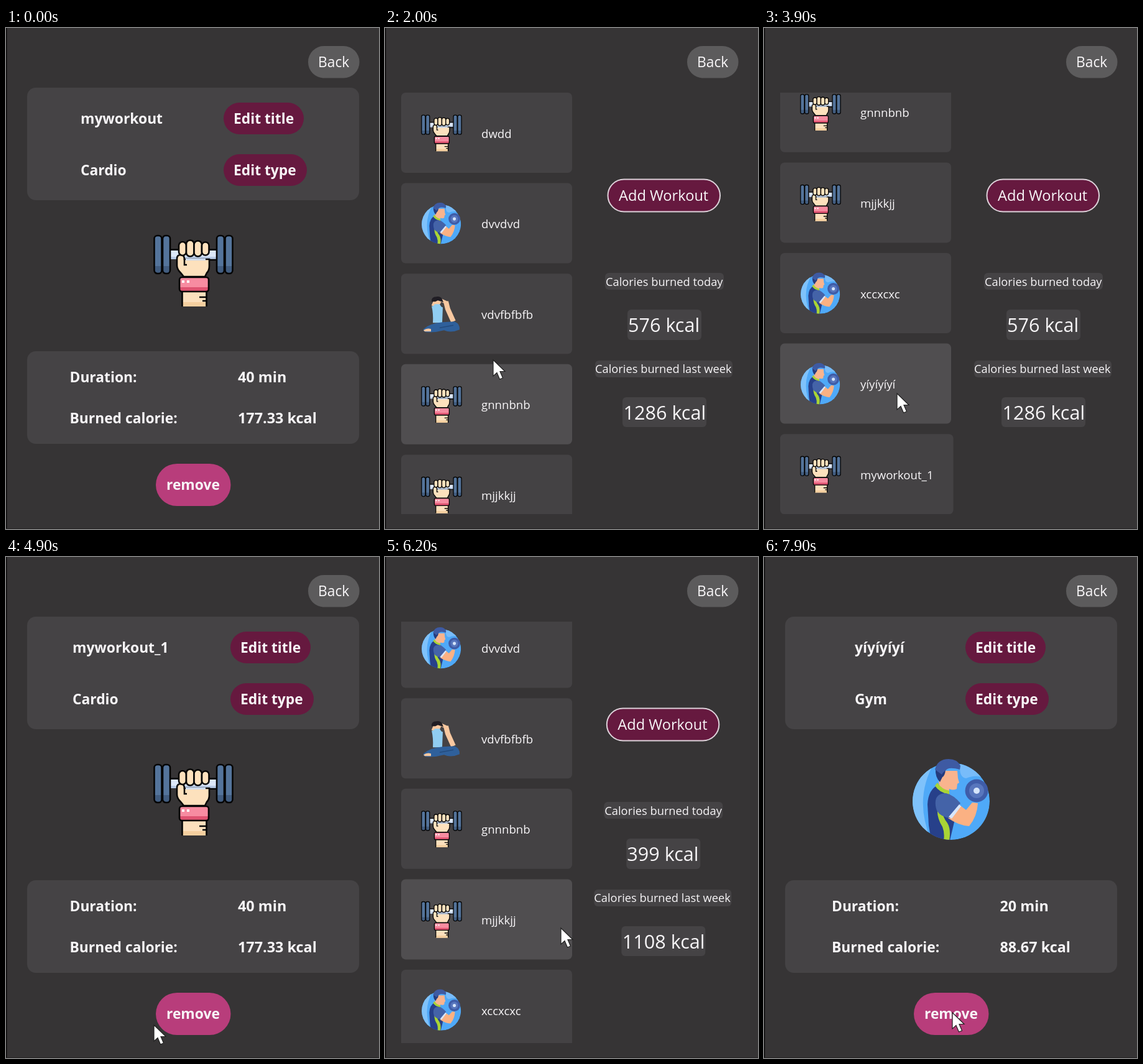
An HTML page for the animation above (8 s loop, 600 by 806 pixels).

```html
<!DOCTYPE html>
<html lang="en">
<head>
<meta charset="utf-8">
<title>Workout tracker</title>
<style>
  html, body { margin: 0; width: 100%; height: 100%; overflow: hidden; background: #363435; }
  svg { display: block; width: 100vw; height: 100vh; }
  text { font-family: "Open Sans", "Noto Sans", sans-serif; fill: #f8f6f8; white-space: pre; }
  .bold { font-weight: 700; font-size: 22.8px; }
  .value { font-size: 23.4px; }
  .mid { font-size: 22.8px; }
  .add { font-size: 23.6px; }
  .small { font-size: 18.3px; }
  .name { font-size: 18.6px; }
  .big { font-size: 30.6px; }
  .panel { fill: #454345; }
  .card { fill: #444244; }
  .card.hover { fill: #504e50; }
  .wine { fill: #66193f; }
</style>
</head>
<body>
<svg viewBox="0 0 600 806" xmlns="http://www.w3.org/2000/svg">
  <defs>
    <clipPath id="view"><rect x="20" y="104" width="300" height="678"/></clipPath>
    <clipPath id="disc"><circle cx="64" cy="67" r="62"/></clipPath>

    <g id="plate">
      <rect x="1.5" y="8" width="12" height="61" rx="5" fill="#54749b"/>
      <path d="M1.5 57h12v7q0 5-5 5h-2q-5 0-5-5z" fill="#425d80"/>
      <rect x="1.5" y="8" width="12" height="61" rx="5" fill="none" stroke="#050505" stroke-width="2.600"/>
    </g>

    <g id="cardio">
      <rect x="28" y="32" width="74" height="14" fill="#dce7f8"/>
      <path d="M28 42h74v4H28z" fill="#b9cbe6"/>
      <path d="M28 30.500h74M50 47h52" stroke="#050505" stroke-width="2.600"/>
      <use href="#plate"/><use href="#plate" x="13.500"/>
      <use href="#plate" x="100.500"/><use href="#plate" x="114"/>
      <path d="M38 45q0-6 6-6 6 0 6 7h40v11q0 7-4 11l-3 6H49l-5-6q-6-6-6-12z" fill="#fde1bd" stroke="#050505" stroke-width="2.600"/>
      <path d="M50 45v10h4" fill="none" stroke="#050505" stroke-width="2.500"/>
      <path d="M52 48h32v-3H52z" fill="#cfdcef"/>
      <g fill="#fde1bd" stroke="#050505" stroke-width="2.600">
        <rect x="41" y="18" width="12" height="22" rx="6"/>
        <rect x="53" y="15.500" width="12.500" height="26" rx="6"/>
        <rect x="65.500" y="16.500" width="12.500" height="25" rx="6"/>
        <rect x="78" y="18.500" width="11.500" height="21" rx="5.500"/>
      </g>
      <path d="M46.500 99h39v23h-39z" fill="#fce0bd"/>
      <path d="M46.500 115h39v7h-39z" fill="#f5cf9f"/>
      <path d="M46.500 99v23M85.500 99v23M74 107h11M79 113h6" stroke="#050505" stroke-width="2.600"/>
      <rect x="42" y="75" width="47" height="23" rx="4" fill="#f78ca1"/>
      <path d="M42 91h47v3q0 4-4 4H46q-4 0-4-4z" fill="#df5371"/>
      <rect x="42" y="75" width="47" height="23" rx="4" fill="none" stroke="#050505" stroke-width="2.600"/>
      <path d="M46 82h4m4 0h4" stroke="#fff" stroke-width="4"/>
    </g>

    <g id="gym">
      <g clip-path="url(#disc)">
        <circle cx="64" cy="67" r="62" fill="#4fa9f8"/>
        <path d="M40 0Q2 60 32 130H-5V0z" fill="#7fc2fb"/>
        <path d="M80 0q-6 28 8 30 14-6 26-2L100 0z" fill="#78bcfa"/>
        <path d="M44 40Q27 48 26 72l2 34 4 24h30l8-34-4-26-6-18z" fill="#27408a"/>
        <path d="M42 80q-1 14 8 28 4 10 2 22h9q3-18-3-28-8-10-8-20z" fill="#a9d435"/>
      </g>
      <path d="M48 18h26l1 12 2 7-3 2-1 8q-6 3-12 0l-1 9-14-6-2-14z" fill="#f9b48e"/>
      <path d="M39 14q-1 14 7 22l4-8q4-2 5-11z" fill="#243b7d"/>
      <path d="M38 16q4-17 22-17 14 0 19 11l-1 6q-14-4-20-1-7 5-9 9z" fill="#3e5aa3"/>
      <path d="M38 42l4-5q7 11 19 13v6q-16-3-23-14z" fill="#a9d435"/>
      <path d="M59 94l20-20 9 7 10-12 9 1q-1 21-14 37-17-1-34-13z" fill="#fbb183"/>
      <path d="M39 66q2-12 17-12 12 3 23 16L62 94q-15-2-21-12-3-8-2-16z" fill="#4463a8"/>
      <path d="M60 92l17-20 3 3-15 20z" fill="#d9e6fa"/>
      <circle cx="105" cy="50" r="18.500" fill="#3f5ca8"/>
      <circle cx="105" cy="50" r="12" fill="#5876bd"/>
      <circle cx="105" cy="50" r="5" fill="#d5e4fa"/>
    </g>

    <g id="yoga" transform="scale(1.96)">
      <path d="M40 13l3 12 9 20" fill="none" stroke="#f8c8a0" stroke-width="8" stroke-linejoin="round"/>
      <path d="M19 20l4-9h10l9 4" fill="none" stroke="#f8c8a0" stroke-width="5"/>
      <circle cx="26" cy="13" r="6" fill="#f8c8a0"/>
      <path d="M17 13q-1-8 8-8 6-1 9 4l2 5-9-3-4 2z" fill="#201d24"/>
      <path d="M17 20q3 1 5-3h8q3 6 5 5l-1 25H19q1-14-2-27z" fill="#90cdf2"/>
      <path d="M4 57q10-9 30-11l20-1q9 4 8 13-14 6-25 1-14 4-29 3-5-1-4-5z" fill="#2f609b"/>
      <path d="M30 55l22-4" stroke="#244b7d" stroke-width="1.500"/>
      <path d="M4 59q5-4 12-2v4H6z" fill="#f8c8a0"/>
    </g>
  </defs>

  <rect width="600" height="806" fill="#363435"/>
  <path d="M.75 0v806" stroke="#0d0c0d" stroke-width="1.500"/>
  <path d="M0 805.500h600" stroke="#222122"/>

  <rect id="back" x="486" y="29" width="82.500" height="51.500" rx="25.500"/>
  <text class="mid" x="502" y="63">Back</text>

  <g id="detail">
    <rect class="panel" x="34" y="96" width="534" height="181" rx="14"/>
    <rect class="panel" x="34" y="520" width="534" height="149" rx="14"/>
    <g id="names" class="bold"><text id="title" y="154"></text><text id="kind" y="236.500"></text></g>
    <g id="edits" class="bold">
      <rect class="wine" y="120" width="129" height="51" rx="25.500"/><text x="16" y="154">Edit title</text>
      <rect class="wine" y="203" width="134" height="51" rx="25.500"/><text x="16" y="236.500">Edit type</text>
    </g>
    <use id="picture" x="237" y="326"/>
    <g id="stats" class="bold">
      <text y="570">Duration:</text><text id="minutes" class="value" x="270.500" y="570"></text>
      <text y="636">Burned calorie:</text><text id="burned" class="value" x="270.500" y="636"></text>
    </g>
    <rect x="241" y="701" width="120.500" height="68" rx="34" fill="#b83d7b"/>
    <text class="bold" x="258" y="743">remove</text>
  </g>

  <g id="list">
    <g clip-path="url(#view)"><g id="cards"></g></g>
    <g id="side">
      <rect class="wine" x="358.500" y="243.500" width="180.500" height="52" rx="26" stroke="#ded2da" stroke-width="2"/>
      <text class="add" x="376" y="278">Add Workout</text>
      <rect class="panel" x="354" y="394" width="191" height="27" rx="6"/>
      <text class="small" x="355" y="414.500">Calories burned today</text>
      <rect class="panel" x="390" y="453" width="119" height="49" rx="6"/>
      <text class="big" id="today" x="391" y="489"></text>
      <rect class="panel" x="338" y="535" width="221" height="27" rx="6"/>
      <text class="small" x="338" y="555">Calories burned last week</text>
      <rect class="panel" x="382" y="594" width="135" height="48" rx="6"/>
      <text class="big" id="week" x="383.500" y="630"></text>
    </g>
  </g>

  <path id="cursor" d="M0 0V26L6 20.500 10.500 31 15.500 29 11 18.500H19Z" fill="#fff" stroke="#222" stroke-width="1.200"/>
</svg>
<script>
const LOOP = 8000, STEP = 100, PITCH = 145.6, TOP = 104, CARD_H = 129;
const $ = id => document.getElementById(id);

const workouts = [
  ["dwdd", "cardio"], ["dvvdvd", "gym"], ["vdvfbfbfb", "yoga"], ["gnnnbnb", "cardio"],
  ["mjjkkjj", "cardio"], ["xccxcxc", "gym"], ["yíyíyíyí", "gym"], ["myworkout_1", "cardio"]
];

// title, type, icon, minutes, calories, x of names, buttons, stats
const before = ["myworkout", "Cardio", "cardio", "40 min", "177.33 kcal", 120, 350, 102.5];
const renamed = ["myworkout_1", "Cardio", "cardio", "40 min", "177.33 kcal", 107, 361, 102.5];
const other = ["yíyíyíyí", "Gym", "gym", "20 min", "88.67 kcal", 146, 324, 109];

// start time, detail data or null for the list
const pages = [[0, before], [200, renamed], [1400, null], [4400, renamed], [5200, null], [7500, other]];
const REMOVED = 5200;

const scrollKeys = [
  [0, 0], [2000, 0], [2500, 345], [2800, 470], [5100, 470],
  [5200, 0], [5900, 0], [6200, 168], [6500, 324.5]
];
const cursorKeys = [
  [100, 300, 738], [900, 530, 45], [1400, 532, 47], [2000, 174, 534], [2500, 101, 538],
  [3200, 130, 560], [3900, 214, 588], [4400, 190, 722], [4900, 238, 753], [5100, 264, 745],
  [5400, 264, 745], [6200, 283, 597], [6700, 250, 620], [7400, 190, 722], [7900, 303, 733]
];

const linear = u => u;
const smooth = u => u * u * (3 - 2 * u);

function sample(keys, t, ease) {
  const next = keys.findIndex(k => k[0] > t);
  if (next < 0) return keys[keys.length - 1].slice(1);
  if (next === 0) return keys[0].slice(1);
  const a = keys[next - 1], b = keys[next];
  const u = ease((t - a[0]) / (b[0] - a[0]));
  return a.slice(1).map((v, i) => v + (b[i + 1] - v) * u);
}

const move = (el, x, y) => el.setAttribute("transform", `translate(${x} ${y})`);
const show = (el, on) => el.style.display = on ? "" : "none";

$("cards").innerHTML = workouts.map(([name, icon], i) => `
  <g transform="translate(26 ${TOP + i * PITCH})">
    <rect class="card" width="${i === 7 ? 278.5 : 275}" height="${CARD_H}" rx="7"/>
    <use href="#${icon}" transform="translate(32 32) scale(.51)"/>
    <text class="name" x="129" y="72.500">${name}</text>
  </g>`).join("");
const cards = [...$("cards").children];

function drawDetail([title, kind, icon, minutes, burned, nameX, editX, statX]) {
  $("title").textContent = title;
  $("kind").textContent = kind;
  $("minutes").textContent = minutes;
  $("burned").textContent = burned;
  $("picture").setAttribute("href", "#" + icon);
  move($("names"), nameX, 0);
  move($("edits"), editX, 0);
  move($("stats"), statX, 0);
}

function drawList(t, x, y) {
  const removed = t >= REMOVED;
  const [scroll] = sample(scrollKeys, t, linear);
  move($("cards"), 0, -scroll);
  cards.forEach((card, i) => {
    const offset = y + 8 - (TOP + i * PITCH - scroll);
    const over = x > 26 && x < 301 && offset > 0 && offset < CARD_H;
    card.firstElementChild.classList.toggle("hover", over);
  });
  show(cards[7], !removed);
  $("today").textContent = removed ? "399 kcal" : "576 kcal";
  $("week").textContent = removed ? "1108 kcal" : "1286 kcal";
  move($("side"), removed ? -1.7 : 0, 0);
}

function draw(t) {
  const detail = pages.filter(p => p[0] <= t).pop()[1];
  const [x, y] = sample(cursorKeys, t, smooth);
  show($("detail"), detail);
  show($("list"), !detail);
  if (detail) drawDetail(detail); else drawList(t, x, y);
  show($("cursor"), t >= cursorKeys[0][0]);
  move($("cursor"), x, y);
  const overBack = x > 486 && x < 568 && y > 29 && y < 81;
  $("back").setAttribute("fill", overBack ? "#747374" : "#5c5b5c");
}

const start = performance.now();
let last = -1;
function tick() {
  const t = Math.floor((performance.now() - start) % LOOP / STEP) * STEP;
  if (t !== last) draw(last = t);
  requestAnimationFrame(tick);
}
tick();
</script>
</body>
</html>
```
